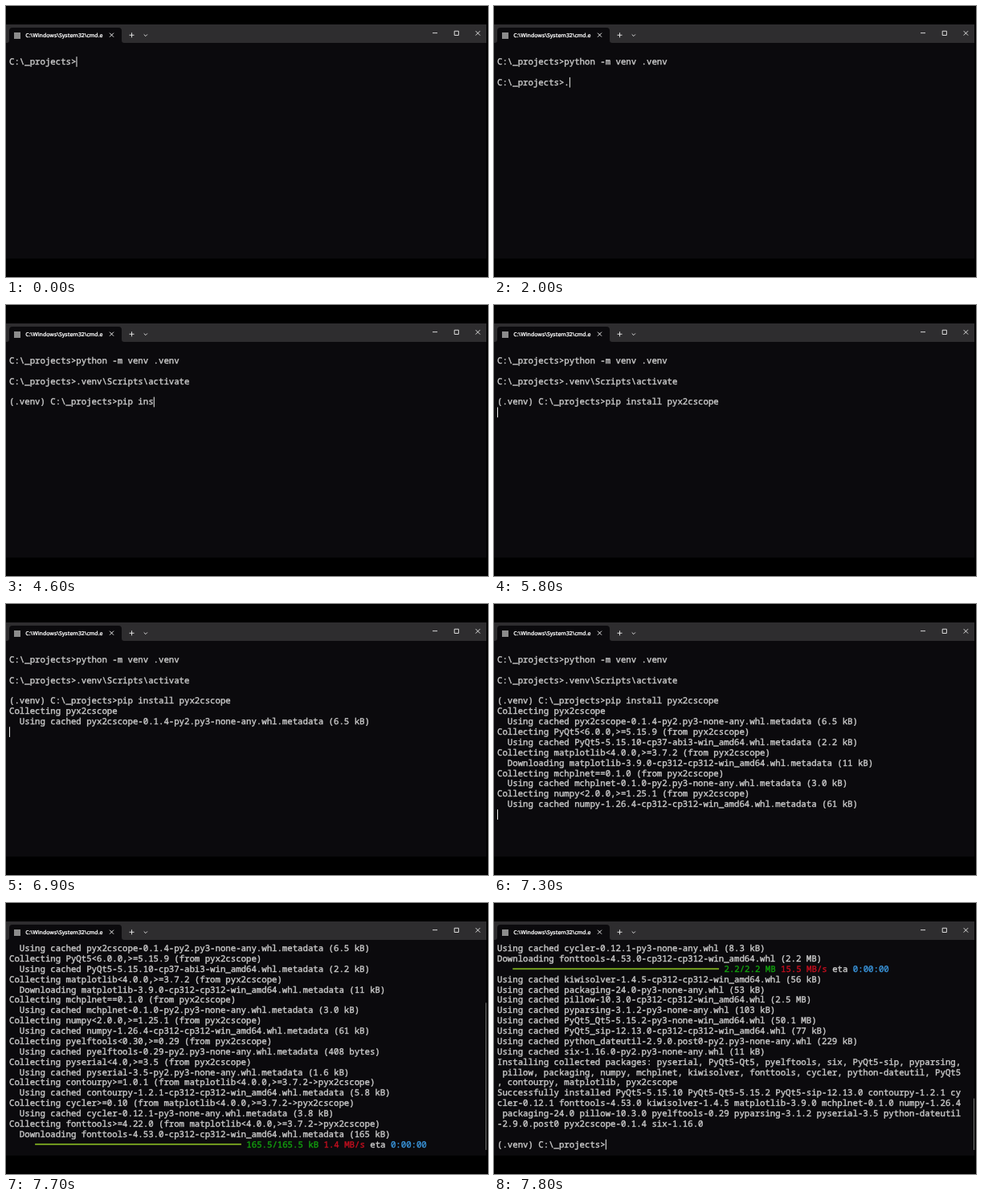
An HTML page that plays this animation: 600 by 338 pixels, repeating every 8 s.

```html
<!DOCTYPE html>
<html lang="en">
<head>
<meta charset="utf-8">
<title>Terminal: installing a package</title>
<style>
  html, body { margin: 0; width: 100%; height: 100%; overflow: hidden; background: #000; }
  svg { display: block; width: 100vw; height: 100vh; }
  text { text-rendering: geometricPrecision; white-space: pre; }
  text, tspan { fill: currentColor; stroke: currentColor; }
  #rows text { font: 10.7px "Noto Sans Mono", "DejaVu Sans Mono", monospace; color: #ccc; stroke-width: .38; }
  .title { font: 600 6.86px "Open Sans", "Noto Sans", sans-serif; color: #fff; stroke-width: .2; }
  .icons { fill: none; stroke: #eee; stroke-width: .9; }
</style>
</head>
<body>
<svg viewBox="0 0 600 338">
  <rect width="600" height="338" fill="#000"/>
  <rect y="23" width="598" height="292" fill="#0b0a0d"/>
  <rect y="23" width="598" height="23" fill="#2e2d2f"/>
  <path d="M1 46q3 0 3-3V31q0-4 4-4H140q4 0 4 4V43q0 3 3 3z" fill="#0b0a0d"/>
  <rect x="10" y="33" width="8" height="8" fill="#8c8c8c"/>
  <text class="title" x="24.3" y="39.2">C:\Windows\System32\cmd.e</text>
  <g class="icons">
    <path d="M129 33.7l5 5m0-5l-5 5" stroke="#fff"/>
    <path d="M153.5 36.3h6m-3-3v6M171.7 35.5l2.1 2.1 2.1-2.1"/>
    <path d="M531 33.7h6M558.2 31.3h5.2v5.2h-5.2zM584.7 31.2l5.4 5.4m0-5.4l-5.4 5.4"/>
  </g>
  <g id="rows"></g>
  <rect id="bar" height="2" fill="#729c1f"/>
  <rect id="thumb" x="597" width="1" fill="#777"/>
  <rect id="cursor" width="1" height="12.7" fill="#eee"/>
</svg>
<script>
const LOOP = 8000, ROWS = 20, LEFT = 4, TOP = 50.3, CELL = 6.42, PITCH = 12.87, BAR_CELLS = 40;
const TRACK_BOTTOM = 308, TRACK_HEIGHT = 257;
const GREEN = '#13a10e', RED = '#c50f1f', BLUE = '#3a96dd';

const prompts = ['C:\\_projects>', 'C:\\_projects>', '(.venv) C:\\_projects>'];
const commands = ['python -m venv .venv', '.venv\\Scripts\\activate', 'pip install pyx2cscope'];

const collect = (spec, file, size, from = ' (from pyx2cscope)', verb = 'Using cached') =>
  [`Collecting ${spec}${from}`, `  ${verb} ${file}.whl.metadata (${size})`];
const viaPlot = ' (from matplotlib<4.0.0,>=3.7.2->pyx2cscope)';
const win = 'cp312-cp312-win_amd64', any = 'py2.py3-none-any';
const progress = (indent, amount, rate) => ({ indent, amount, rate });

const collected = [
  ...collect('pyx2cscope', `pyx2cscope-0.1.4-${any}`, '6.5 kB', ''),
  ...collect('PyQt5<6.0.0,>=5.15.9', 'PyQt5-5.15.10-cp37-abi3-win_amd64', '2.2 kB'),
  ...collect('matplotlib<4.0.0,>=3.7.2', `matplotlib-3.9.0-${win}`, '11 kB', undefined, 'Downloading'),
  ...collect('mchplnet==0.1.0', `mchplnet-0.1.0-${any}`, '3.0 kB'),
  ...collect('numpy<2.0.0,>=1.25.1', `numpy-1.26.4-${win}`, '61 kB'),
  ...collect('pyelftools<0.30,>=0.29', `pyelftools-0.29-${any}`, '408 bytes'),
  ...collect('pyserial<4.0,>=3.5', `pyserial-3.5-${any}`, '1.6 kB'),
  ...collect('contourpy>=1.0.1', `contourpy-1.2.1-${win}`, '5.8 kB', viaPlot),
  ...collect('cycler>=0.10', 'cycler-0.12.1-py3-none-any', '3.8 kB', viaPlot),
  ...collect('fonttools>=4.22.0', `fonttools-4.53.0-${win}`, '165 kB', viaPlot, 'Downloading'),
  progress(5, '165.5/165.5 kB', '1.4 MB/s')
];

const cached = (file, size) => `Using cached ${file}.whl (${size})`;
const finished = [
  cached('cycler-0.12.1-py3-none-any', '8.3 kB'),
  `Downloading fonttools-4.53.0-${win}.whl (2.2 MB)`,
  progress(3, '2.2/2.2 MB', '15.5 MB/s'),
  cached(`kiwisolver-1.4.5-${win}`, '56 kB'),
  cached('packaging-24.0-py3-none-any', '53 kB'),
  cached(`pillow-10.3.0-${win}`, '2.5 MB'),
  cached('pyparsing-3.1.2-py3-none-any', '103 kB'),
  cached('PyQt5_Qt5-5.15.2-py3-none-win_amd64', '50.1 MB'),
  cached(`PyQt5_sip-12.13.0-${win}`, '77 kB'),
  cached(`python_dateutil-2.9.0.post0-${any}`, '229 kB'),
  cached(`six-1.16.0-${any}`, '11 kB'),
  'Installing collected packages: pyserial, PyQt5-Qt5, pyelftools, six, PyQt5-sip, pyparsing,',
  ' pillow, packaging, numpy, mchplnet, kiwisolver, fonttools, cycler, python-dateutil, PyQt5',
  ', contourpy, matplotlib, pyx2cscope',
  'Successfully installed PyQt5-5.15.10 PyQt5-Qt5-5.15.2 PyQt5-sip-12.13.0 contourpy-1.2.1 cy',
  'cler-0.12.1 fonttools-4.53.0 kiwisolver-1.4.5 matplotlib-3.9.0 mchplnet-0.1.0 numpy-1.26.4',
  ' packaging-24.0 pillow-10.3.0 pyelftools-0.29 pyparsing-3.1.2 pyserial-3.5 python-dateutil',
  '-2.9.0.post0 pyx2cscope-0.1.4 six-1.16.0',
  '',
  prompts[2]
];

// Typing per command: [time, characters shown, cursor hidden]
const typing = [
  [[0, 0], [100, 1], [200, 3], [300, 4], [400, 6], [600, 7], [700, 8], [800, 9], [1000, 10],
   [1200, 12], [1300, 13], [1500, 14], [1700, 16], [1900, 20]],
  [[2000, 1], [2100, 3], [2200, 5], [2400, 5, true], [2600, 6], [2800, 6, true], [2900, 6],
   [3100, 8], [3200, 11], [3300, 14], [3400, 18], [3500, 22]],
  [[3600, 0], [3800, 1], [3900, 2], [4000, 3], [4100, 4], [4400, 5], [4500, 6], [4600, 7],
   [4700, 9], [4900, 11], [5100, 12], [5400, 13], [5500, 14]]
];
// Output: [time, lines shown]
const output = [[5800, 0], [6900, 2], [7000, 4], [7100, 6], [7200, 8], [7300, 10],
  [7400, 14], [7500, 16], [7600, 18], [7700, 21]];

const history = count => prompts.slice(0, count).flatMap((p, i) => ['', p + commands[i]]);

const steps = [
  ...typing.flatMap((keys, i) => keys.map(([time, count, hidden]) => ({
    time, hidden, lines: [...history(i), '', prompts[i] + commands[i].slice(0, count)]
  }))),
  ...output.map(([time, count]) => {
    const lines = [...history(3), ...collected.slice(0, count)];
    const hidden = count === collected.length;
    return { time, hidden, lines: hidden ? lines : [...lines, ''], total: lines.length + 1 };
  }),
  { time: 7800, lines: finished, total: 80 }
];

const byId = id => document.getElementById(id);
const [rowGroup, bar, thumb, cursor] = ['rows', 'bar', 'thumb', 'cursor'].map(byId);
const make = (name, attrs = {}) => set(document.createElementNS('http://www.w3.org/2000/svg', name), attrs);
function set(node, attrs) {
  for (const key in attrs) node.setAttribute(key, attrs[key]);
  return node;
}
const rows = Array.from({ length: ROWS }, (_, i) =>
  rowGroup.appendChild(make('text', { x: LEFT, y: TOP + 9.8 + i * PITCH })));

function drawProgress(row, index, { indent, amount, rate }) {
  const start = LEFT + indent * CELL;
  const parts = [[amount, GREEN], [' ' + rate, RED], [' eta ', '#ccc'], ['0:00:00', BLUE]];
  set(row, { x: start + (BAR_CELLS + 1) * CELL });
  row.replaceChildren(...parts.map(([text, color]) => {
    const span = make('tspan', { style: `color:${color}` });
    span.textContent = text;
    return span;
  }));
  set(bar, { x: start, y: TOP + 5.1 + index * PITCH, width: BAR_CELLS * CELL });
}

function draw({ lines, hidden, total = lines.length }) {
  const view = lines.slice(-ROWS);
  set(bar, { width: 0 });
  rows.forEach((row, i) => {
    const line = view[i] ?? '';
    if (typeof line === 'object') return drawProgress(row, i, line);
    set(row, { x: LEFT });
    row.textContent = line;
  });
  const last = view.length - 1;
  set(cursor, {
    x: LEFT + (view[last].length ?? 0) * CELL,
    y: TOP + last * PITCH,
    visibility: hidden ? 'hidden' : 'visible'
  });
  const height = total > ROWS ? TRACK_HEIGHT * ROWS / total : 0;
  set(thumb, { y: TRACK_BOTTOM - height, height });
}

const begin = performance.now();
let shown;
function tick() {
  const time = (performance.now() - begin) % LOOP;
  const step = steps.findLast(s => s.time <= time) ?? steps[0];
  if (step !== shown) draw(shown = step);
  requestAnimationFrame(tick);
}
tick();
</script>
</body>
</html>
```
